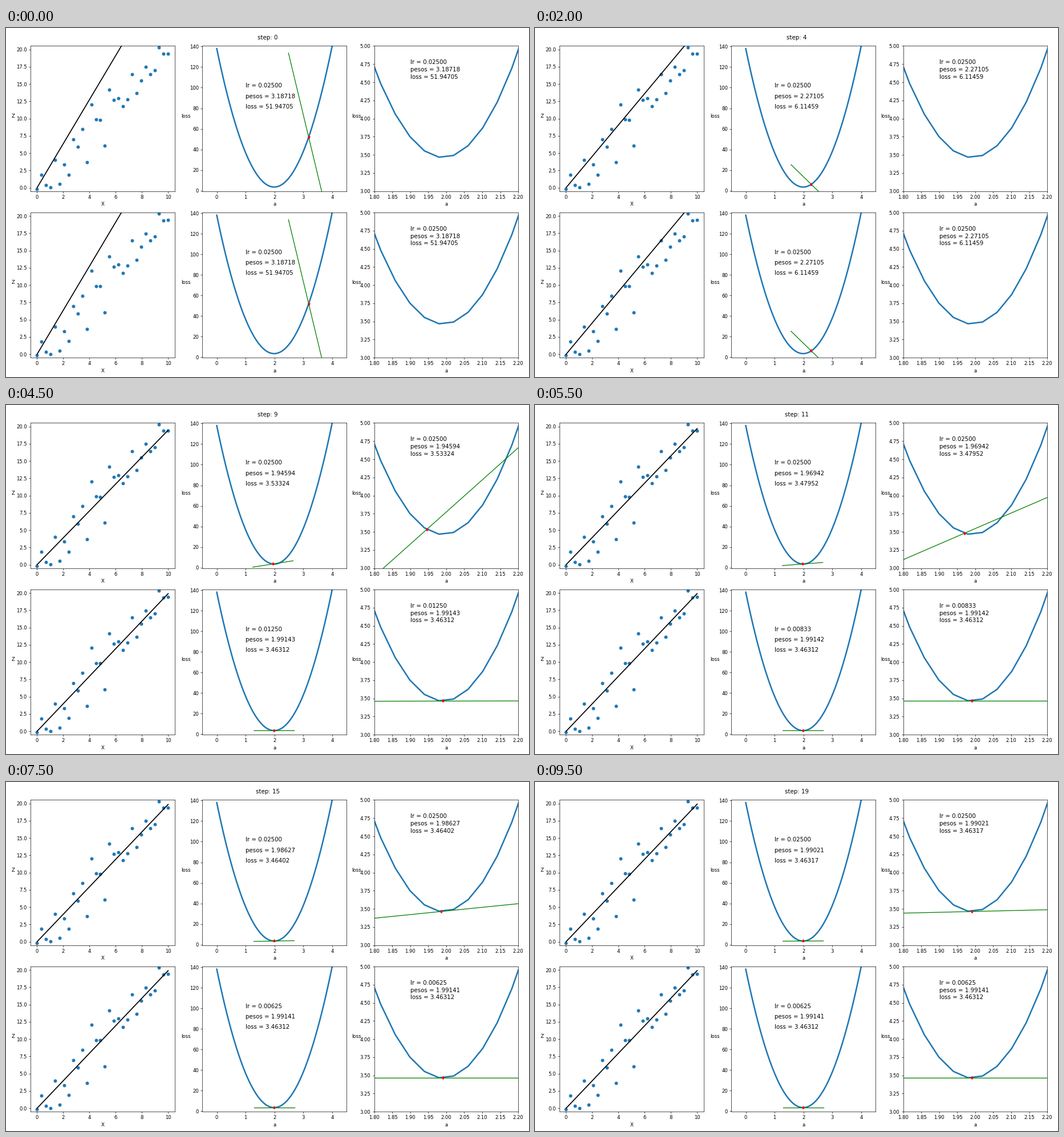
These frames come from a looping animation (917 by 611 pixels, 10000 ms). A matplotlib script:

```python
import numpy as np
import matplotlib.pyplot as plt
from matplotlib.animation import FuncAnimation

W, H = 917, 611
DPI = W / 15
STEPS, INTERVAL = 20, 500

# Scatter data and the quadratic loss of the fit z = a * x
x = np.linspace(0, 10, 30)
z = np.array([-0.17, 1.87, 0.36, 0.02, 3.98, 0.53, 3.32, 1.88, 6.95, 5.88,
              8.46, 3.66, 12.06, 9.86, 9.82, 6.06, 14.18, 12.67, 12.97, 11.76,
              12.79, 16.42, 13.67, 15.54, 17.46, 16.42, 17.0, 20.31, 19.38, 19.4])
CURVATURE = np.mean(x ** 2)
BEST_A, MIN_LOSS = 1.9914113, 3.463120
LR = 0.025
START = BEST_A + 1.1957696 / (1 - 2 * CURVATURE * LR)


def loss(a):
    return MIN_LOSS + CURVATURE * (a - BEST_A) ** 2


def descend(rate):
    """List (lr, a, slope) after each step of gradient descent."""
    a, states = START, []
    for step in range(STEPS):
        lr = rate(step)
        slope = 2 * CURVATURE * (a - BEST_A)
        a -= lr * slope
        states.append((lr, a, slope))
    return states


runs = [descend(lambda step: LR),
        descend(lambda step: LR / (1 + step // 5))]

plt.rcParams["font.family"] = "DejaVu Sans"
fig = plt.figure(figsize=(W / DPI, (H + 0.01) / DPI), dpi=DPI, facecolor="white")
title = fig.suptitle("")


def add_axes(row, col, xlim, ylim, xlabel, ylabel):
    left, bottom = 43 + 301.25 * col, 285.6 + 291.6 * row
    ax = fig.add_axes([left / W, 1 - bottom / H, 252.8 / W, 254.1 / H])
    ax.set(xlim=xlim, ylim=ylim, xlabel=xlabel)
    ax.set_ylabel(ylabel, rotation=0, labelpad=7.3)
    return ax


class FitPanel:
    def __init__(self, row):
        ax = add_axes(row, 0, (-0.5, 10.5), (-0.5, 20.5), "X", "Z")
        ax.plot(x, z, "o", color="C0")
        self.line, = ax.plot([], [], color="black", lw=2)

    def update(self, lr, a, slope):
        self.line.set_data(x, a * x)


class LossPanel:
    def __init__(self, row, col, xlim, ylim, text_x, text_ys):
        ax = add_axes(row, col, xlim, ylim, "a", "loss")
        grid = np.linspace(0, 4, 100)
        ax.plot(grid, loss(grid), color="C0", lw=3)
        self.tangent, = ax.plot([], [], color="green")
        self.star, = ax.plot([], [], "*", color="red")
        self.texts = [ax.text(text_x, y, "", fontsize=12) for y in text_ys]

    def update(self, lr, a, slope):
        value = loss(a)
        reach = np.array([-0.7, 0.7])
        self.tangent.set_data(a + reach, value + slope * reach)
        self.star.set_data([a], [value])
        for text, name, number in zip(self.texts, ("lr", "pesos", "loss"),
                                      (lr, a, value)):
            text.set_text(f"{name} = {number:.5f}")


rows = [(FitPanel(row),
         LossPanel(row, 1, (-0.5, 4.5), (-0.5, 140.5), 1, (100, 90, 80)),
         LossPanel(row, 2, (1.8, 2.2), (3, 5), 1.9, (4.75, 4.65, 4.55)))
        for row in range(2)]


def draw(step):
    title.set_text(f"step: {step}")
    for panels, states in zip(rows, runs):
        for panel in panels:
            panel.update(*states[step])
    return []


anim = FuncAnimation(fig, draw, frames=STEPS, interval=INTERVAL,
                     init_func=lambda: draw(0), repeat=True, repeat_delay=0)
plt.show()
```
